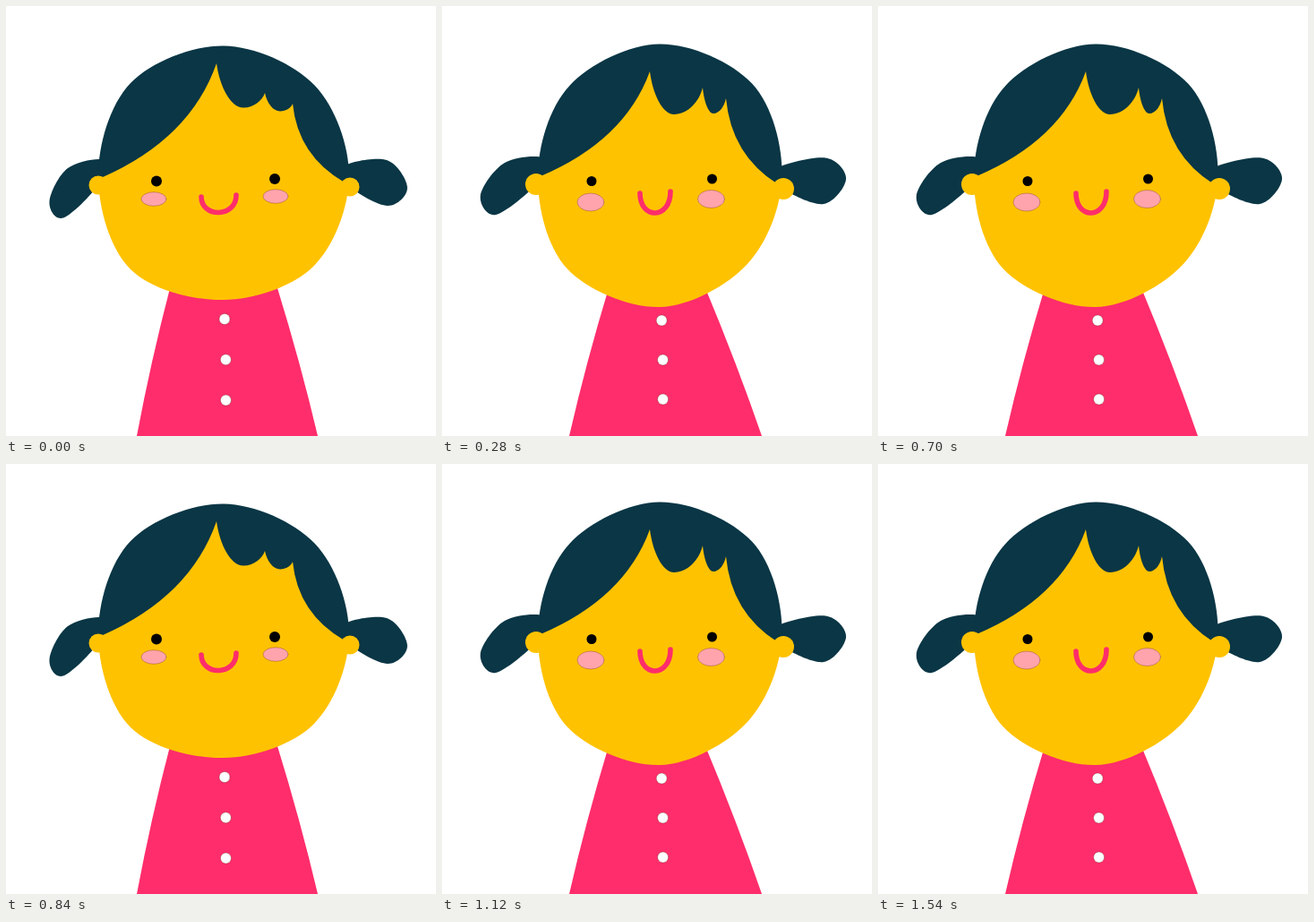
Animation, 480 px wide and 480 px high, one loop 1.68 s. Source, as an HTML page with a canvas:

```html
<!DOCTYPE html>
<html lang="en">
<head>
<meta charset="utf-8">
<title>Girl with pigtails</title>
<style>
  html, body { margin: 0; width: 100%; height: 100%; overflow: hidden; background: #fff; }
  canvas { display: block; width: 100vmin; height: 100vmin; }
</style>
</head>
<body>
<canvas id="stage" width="480" height="480"></canvas>
<script>
const ctx = document.getElementById('stage').getContext('2d');
const HAIR = '#0a3645', SKIN = '#ffc200', PINK = '#ff2d6b', BLUSH = '#ffa4ac';
const EDGE = 'rgba(90, 40, 20, 0.4)';
const SIZE = 480, STEP = 140, STEPS = 12, BLINK_STEP = 7;
const HEAD_CENTER = [243, 190], NECK_Y = 315;

// head: radii every 45 degrees, clockwise from the right
// fringe: peak, then dips and tips in turn
// body: left and right at the neck, then at the hem
const poses = [
  {
    head: [140, 142, 138, 147, 140, 147, 145.5, 143.5],
    fringe: [[235, 64], [265, 113.5], [289, 97], [306, 117.5], [320, 109]],
    ears: [[103, 200], [384, 202]], earSize: 10.5,
    tails: [[[110, 172], [69, 181], [48.5, 218], [64, 236.5]],
            [[376, 179], [425, 172], [448, 203], [426, 223]]],
    eyes: [[168, 195.5], [300, 193]], eyeSize: 6,
    cheeks: [[165, 215.5], [301, 212.5]], cheekSize: [14, 7.8], cheekEdge: EDGE,
    mouth: { left: 218, right: 257, y: 212, depth: 18.5 },
    body: [183, 303, 146, 348],
    buttons: { x: 244, y: 349.5, gap: 45.3 }
  },
  {
    head: [143, 139, 138, 142, 137.5, 147.5, 143, 141],
    fringe: [[228, 68], [266, 124], [289, 97], [307, 120], [319, 113]],
    ears: [[102.5, 200], [386.5, 204]], earSize: 10,
    tails: [[[112, 172], [70, 176.5], [42, 209], [62, 230]],
            [[376, 180], [425, 179], [444, 209], [421, 231]]],
    eyes: [[168.5, 196], [300, 194]], eyeSize: 6.1,
    cheeks: [[170, 216], [302, 214.5]], cheekSize: [14, 7.3],
    mouth: { left: 222, right: 248, y: 209.5, depth: 19 },
    body: [184.5, 298.5, 139, 348],
    buttons: { x: 244.5, y: 348.5, gap: 46 }
  },
  {
    head: [136.5, 138.5, 146, 146, 136, 142.6, 147.5, 146],
    fringe: [[232, 73], [259, 121], [291, 91], [303, 120], [317, 103]],
    ears: [[105, 199], [381, 204]], earSize: 12,
    tails: [[[114, 170], [70, 175], [43, 211], [60, 233]],
            [[372, 182], [428, 169.5], [451, 193], [426, 221]]],
    eyes: [[167, 195.5], [301.5, 193]], eyeSize: 5.5,
    cheeks: [[166, 219], [300.5, 215.5]], cheekSize: [15, 10], cheekEdge: EDGE,
    mouth: { left: 221, right: 255, y: 208, depth: 23 },
    body: [186, 294, 142, 357],
    buttons: { x: 245.2, y: 351, gap: 44 }
  }
];

// Smooth closed curve through a few points.
function loop(pts) {
  const path = new Path2D(), n = pts.length;
  path.moveTo(...pts[0]);
  for (let i = 0; i < n; i++) {
    const [a, b, c, d] = [n - 1, 0, 1, 2].map(k => pts[(i + k) % n]);
    path.bezierCurveTo(
      b[0] + (c[0] - a[0]) / 6, b[1] + (c[1] - a[1]) / 6,
      c[0] - (d[0] - b[0]) / 6, c[1] - (d[1] - b[1]) / 6, ...c);
  }
  return path;
}

function headPath(radii) {
  return loop(radii.map((r, i) => {
    const angle = i * 2 * Math.PI / radii.length;
    return [HEAD_CENTER[0] + r * Math.cos(angle), HEAD_CENTER[1] + r * Math.sin(angle)];
  }));
}

const between = (a, b, u, v) => [a[0] + (b[0] - a[0]) * u, a[1] + (b[1] - a[1]) * v];

// Everything below the fringe; the head outline clips it.
function skinPath({ fringe, ears: [left, right] }) {
  const start = [left[0] + 5, left[1] - 9], end = [right[0] - 6, right[1] - 5];
  const path = new Path2D();
  path.moveTo(0, left[1]);
  path.lineTo(...left);
  path.lineTo(...start);
  path.quadraticCurveTo(...between(start, fringe[0], 0.77, 0.34), ...fringe[0]);
  for (let i = 0; i < fringe.length - 1; i += 2) {
    const [tip, dip, next] = fringe.slice(i, i + 3);
    path.bezierCurveTo(...between(tip, dip, 0.12, 0.53), ...between(tip, dip, 0.53, 1), ...dip);
    path.bezierCurveTo(...between(next, dip, 0.53, 1), ...between(next, dip, 0.12, 0.53), ...next);
  }
  const tip = fringe[fringe.length - 1];
  path.quadraticCurveTo(...between(tip, end, 0.1, 0.66), ...end);
  path.lineTo(...right);
  path.lineTo(SIZE, right[1]);
  path.lineTo(SIZE, SIZE);
  path.lineTo(0, SIZE);
  return path;
}

function drawBody([neckL, neckR, hemL, hemR]) {
  const midY = (NECK_Y + SIZE) / 2, bulge = 3;
  ctx.fillStyle = PINK;
  ctx.beginPath();
  ctx.moveTo(neckL, NECK_Y);
  ctx.quadraticCurveTo((neckL + hemL) / 2 - bulge, midY, hemL, SIZE);
  ctx.lineTo(hemR, SIZE);
  ctx.quadraticCurveTo((neckR + hemR) / 2 + bulge, midY, neckR, NECK_Y);
  ctx.fill();
}

function drawHead(pose) {
  ctx.save();
  ctx.clip(headPath(pose.head));
  ctx.fillStyle = HAIR;
  ctx.fillRect(0, 0, SIZE, pose.ears[1][1]);
  ctx.fillStyle = SKIN;
  ctx.fill(skinPath(pose));
  ctx.restore();
}

function drawMouth({ left, right, y, depth }) {
  const low = y + depth / 0.75;
  ctx.strokeStyle = PINK;
  ctx.lineWidth = 5.6;
  ctx.lineCap = 'round';
  ctx.beginPath();
  ctx.moveTo(left, y + 1);
  ctx.bezierCurveTo(left, low, right, low, right, y - 1);
  ctx.stroke();
}

function oval([x, y], rx, ry, color, edge) {
  ctx.beginPath();
  ctx.ellipse(x, y, rx, ry, 0, 0, Math.PI * 2);
  ctx.fillStyle = color;
  ctx.fill();
  if (edge) {
    ctx.strokeStyle = edge;
    ctx.lineWidth = 0.8;
    ctx.stroke();
  }
}

function drawGirl(pose, eyesOpen) {
  const { ears, earSize, eyes, eyeSize, cheeks, cheekSize, buttons } = pose;
  ctx.fillStyle = '#fff';
  ctx.fillRect(0, 0, SIZE, SIZE);
  drawBody(pose.body);
  for (let i = 0; i < 3; i++) {
    oval([buttons.x + 1.6 * Math.sin(i), buttons.y + i * buttons.gap], 6, 6, '#fff', EDGE);
  }
  ctx.fillStyle = HAIR;
  pose.tails.forEach((tail, i) => ctx.fill(loop([ears[i], ...tail])));
  drawHead(pose);
  ears.forEach(p => oval(p, earSize, earSize, SKIN));
  cheeks.forEach(p => oval(p, ...cheekSize, BLUSH, pose.cheekEdge));
  if (eyesOpen) eyes.forEach(p => oval(p, eyeSize, eyeSize, '#000'));
  drawMouth(pose.mouth);
}

function play() {
  const step = Math.floor(performance.now() / STEP) % STEPS;
  drawGirl(poses[step % poses.length], step !== BLINK_STEP);
  requestAnimationFrame(play);
}
play();
</script>
</body>
</html>
```
